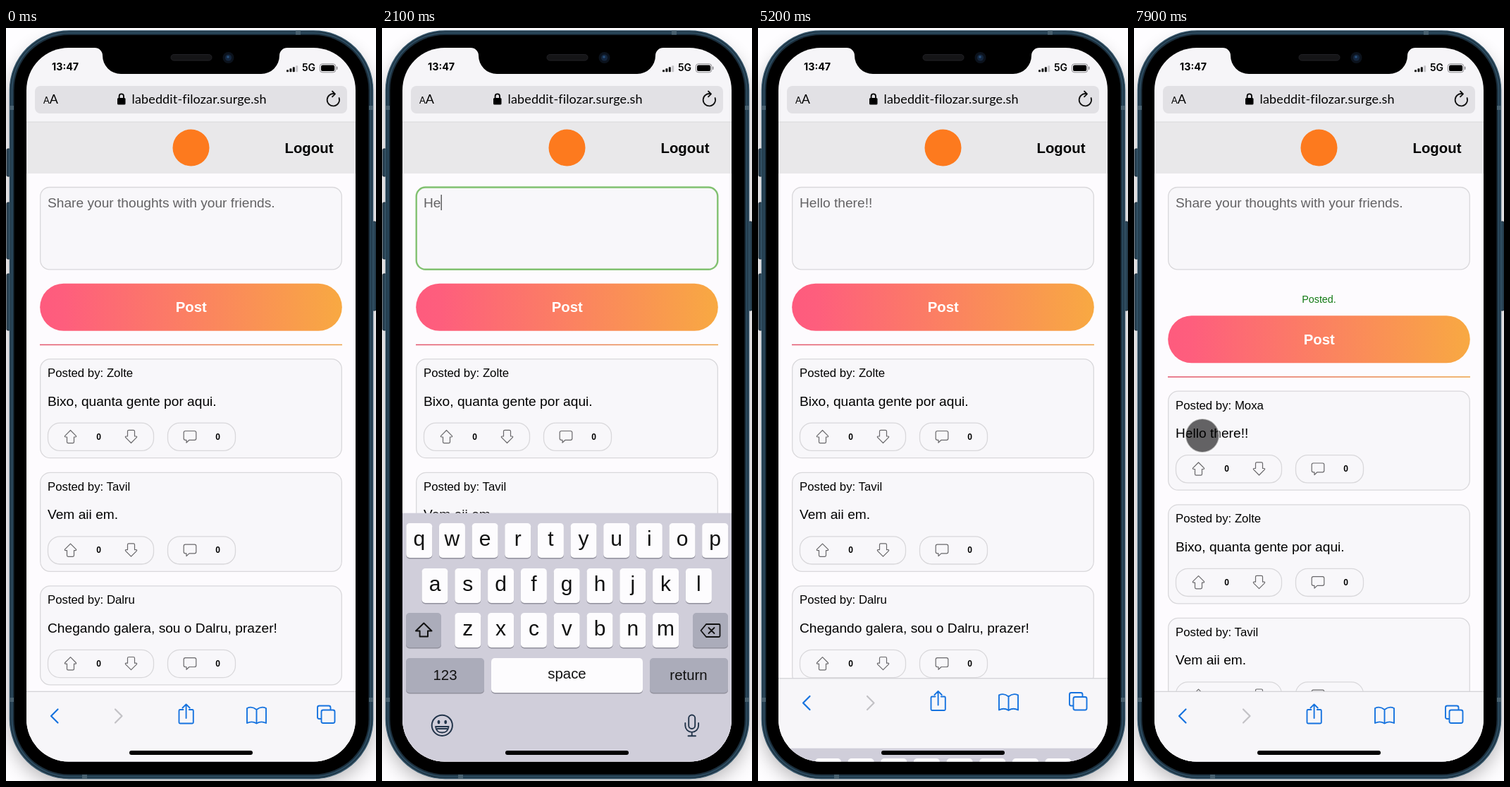
Write an HTML page that moves like this. It is 525x1066 px and loops after 8000 ms.

```html
<!DOCTYPE html>
<html lang="en">
<head>
<meta charset="utf-8">
<title>Posting on a phone</title>
<style>
  html, body { margin: 0; width: 100%; height: 100%; overflow: hidden; background: #fff; }
  svg { display: block; width: 525px; height: 1066px; }
  text { font-family: "Liberation Sans", Arial, sans-serif; white-space: pre; }
  .box { fill: #f8f7fa; stroke: #d9d8db; stroke-width: 1.3; }
  .line { fill: none; stroke-linecap: round; stroke-linejoin: round; }
  .bold { font-weight: 700; }
  .mid { text-anchor: middle; }
  .body { font-size: 19.16px; }
  .grey { fill: #636264; }
</style>
</head>
<body>
<svg id="stage" viewBox="0 0 525 1066"></svg>
<script>
const LOOP = 8000;
const TYPED = "Hello there!!";
const KEYBOARD = 351.5;

const rect = (x, y, w, h, r, attrs) =>
  `<rect x="${x}" y="${y}" width="${w}" height="${h}" rx="${r}" ${attrs}/>`;
const path = (d, color, width = 1.9) =>
  `<path class="line" d="${d}" stroke="${color}" stroke-width="${width}"/>`;
const text = (x, y, str, attrs = "") => `<text x="${x}" y="${y}" ${attrs}>${str}</text>`;
const group = (id, inner) => `<g id="${id}">${inner}</g>`;

const defs = `<defs>
  <linearGradient id="warm" gradientUnits="userSpaceOnUse" x1="48" x2="477" y1="0" y2="0">
    <stop stop-color="#fe5b7e"/><stop offset=".08" stop-color="#fe5e7d"/><stop offset="1" stop-color="#f8a942"/>
  </linearGradient>
  <linearGradient id="rule" gradientUnits="userSpaceOnUse" x1="48" x2="477" y1="0" y2="0">
    <stop stop-color="#e2566f"/><stop offset="1" stop-color="#eda145"/>
  </linearGradient>
  <filter id="soft" filterUnits="userSpaceOnUse" x="-60" y="-60" width="645" height="1220">
    <feGaussianBlur stdDeviation="14"/>
  </filter>
  <clipPath id="glass">${rect(29, 28, 467, 1010.5, 60, "")}</clipPath>
</defs>`;

function phone() {
  const sides = [[1, 171, 39], [1, 247, 80], [1, 348, 80], [520, 274, 126]]
    .map(([x, y, h]) => rect(x, y, 5, h, 1.5, 'fill="#2a4456" stroke="#16242f"')).join("");
  const bands = [[411, 3.5, 7, 6], [108, 1057, 7, 6], [5, 110, 6, 6], [515, 110, 6, 6], [5, 948, 6, 6], [515, 948, 6, 6]]
    .map(([x, y, w, h]) => rect(x, y, w, h, 0, 'fill="#48606f"')).join("");
  return rect(0, 0, 525, 1066, 0, 'fill="#fefdff"') +
    rect(6, 20, 514, 1050, 84, 'fill="#000" opacity=".3" filter="url(#soft)"') + sides +
    rect(5.5, 4, 515, 1058.5, 84, 'fill="#1b2e3c" stroke="#35566b" stroke-width="1.5"') +
    rect(8.5, 7, 509, 1052.5, 81, 'fill="none" stroke="#2d4d62" stroke-width="2"') + bands +
    rect(11.5, 10, 503, 1046.5, 78, 'fill="#000"');
}

function card(y, name, message) {
  const up = "M91.5 569.5L99.3 577.3Q100.3 579 98.5 579H96.5V586Q96.5 587.7 94.8 587.7H88.2Q86.5 587.7 86.5 586V579H84.5Q82.7 579 83.7 577.3Z";
  const bubble = "M254.5 570.5H267.5Q269.8 570.5 269.8 572.8V581Q269.8 583.3 267.5 583.3H260L256 587V583.3H254.5Q252.2 583.3 252.2 581V572.8Q252.2 570.5 254.5 570.5Z";
  const ink = "#69686b";
  return `<g transform="translate(0 ${y})">` +
    rect(48.7, 468.7, 427.6, 140, 14, 'class="box"') +
    text(59, 494, "Posted by: " + name, 'font-size="16.77"') +
    text(59, 534.5, message, 'class="body"') +
    rect(59.5, 559.2, 150, 39.2, 17, 'class="box"') +
    rect(229.5, 559.2, 96, 39.2, 17, 'class="box"') +
    path(up, ink, 1.2) +
    `<g transform="translate(269 1157) rotate(180)">${path(up, ink, 1.2)}</g>` +
    path(bubble, ink, 1.2) +
    [131.5, 300.5].map(x => text(x, 582.8, "0", 'class="bold mid" font-size="12"')).join("") +
    "</g>";
}

function page() {
  const posts = [
    ["Zolte", "Bixo, quanta gente por aqui."],
    ["Tavil", "Vem aii em."],
    ["Dalru", "Chegando galera, sou o Dalru, prazer!"]
  ];
  return rect(29, 133, 467, 910, 0, 'fill="#fdfbfe"') +
    rect(29, 133, 467, 73, 0, 'fill="#e9e8ea"') +
    '<circle cx="262.5" cy="169.5" r="26" fill="#fd7a1e"/>' +
    text(395.5, 177, "Logout", 'class="bold" font-size="20.35"') +
    rect(48.7, 225.5, 427.6, 116.3, 13, 'id="field" class="box"') +
    text(59, 254, "", 'id="entry" class="body grey"') +
    rect(0, 236, 1.4, 22, 0, 'id="caret" fill="#555"') +
    text(262.5, 389, "Posted.", 'id="notice" class="mid" font-size="14.36" fill="#127a14"') +
    group("lower",
      rect(48.2, 361.7, 428.6, 67, 33.5, 'fill="url(#warm)"') +
      text(262.7, 402, "Post", 'class="bold mid" font-size="20.35" fill="#fff"') +
      rect(48, 447.7, 429, 1.5, 0, 'fill="url(#rule)"') +
      group("fresh", card(0, "Moxa", TYPED)) +
      group("feed", posts.map((p, i) => card(i * 160.6, ...p)).join("")));
}

function topBar() {
  const bars = [3, 5, 7, 9].map((h, i) =>
    rect(398 + i * 4.4, 62.2 - h, 3, h, 0.8, `fill="${i < 3 ? "#111" : "#c5c4c8"}"`)).join("");
  return rect(29, 28, 467, 105, 0, 'fill="#f6f5f8"') +
    rect(29, 132.5, 467, 1, 0, 'fill="#dad9dc"') +
    text(65, 59.5, "13:47", 'class="bold" font-size="14.3" style="font-family:Inter,sans-serif"') +
    bars + text(420, 61, "5G", 'font-size="14" font-weight="600" style="font-family:Inter,sans-serif"') +
    rect(445.3, 50.8, 22.5, 12, 3.6, 'fill="none" stroke="#8b8a8e"') +
    rect(447, 52.5, 19.2, 8.6, 2.2, "") + rect(469, 54.5, 1.4, 4.5, 0.7, 'fill="#8b8a8e"') +
    rect(41, 82, 443, 39, 8, 'fill="#e2e1e5"') +
    text(53, 107, 'A<tspan font-size="18">A</tspan>', 'font-size="13" style="font-family:Lato,sans-serif"') +
    rect(158, 99, 11.5, 9.5, 1.6, "") + path("M160.6 99V96.5A3.2 3.2 0 0 1 167 96.5V99", "#000", 1.8) +
    text(178.5, 107, "labeddit-filozar.surge.sh", 'font-size="18" letter-spacing=".15" style="font-family:Lato,sans-serif"') +
    path("M472.6 99A8.7 8.7 0 1 1 466 93.2M463 89.5L467 93.3L463 97.3", "#111", 1.8) +
    '<path d="M126 27H399V28A11 11 0 0 0 388 39A26 26 0 0 1 362 65H163A26 26 0 0 1 137 39A11 11 0 0 0 126 28Z"/>' +
    rect(234, 37.5, 58, 8.5, 4.2, 'fill="#151517" stroke="#222226"') +
    '<circle cx="315.5" cy="42" r="8" fill="#0b121c"/><circle cx="315.5" cy="42" r="4.6" fill="#14263f"/><circle cx="315" cy="41" r="1.8" fill="#28507c"/>';
}

function toolbar() {
  const blue = "#1673df";
  return rect(29, 939, 467, 100, 0, 'fill="#f7f6f9"') +
    rect(29, 938.7, 467, 1.2, 0, 'fill="#d1d0d4"') +
    path("M73.5 964.5L64 974L73.5 983.5", blue, 2.2) +
    path("M155 964.5L164.5 974L155 983.5", "#c3c2c6", 2.2) +
    path("M251.5 965H247Q245.5 965 245.5 966.5V983Q245.5 984.5 247 984.5H264.3Q265.8 984.5 265.8 983V966.5Q265.8 965 264.3 965H259.8M255.6 977V957.5M250.5 962.5L255.6 957.4L260.7 962.5", blue) +
    path("M355.5 965Q349 959.5 342 963V984Q349 980.5 355.5 984.5Q362 980.5 369 984V963Q362 959.5 355.5 965V984.5", blue) +
    path("M447.5 978H444.5Q442 978 442 975.5V962Q442 959.5 444.5 959.5H458Q460.5 959.5 460.5 962V965M450 965.5H464Q466.5 965.5 466.5 968V981.5Q466.5 984 464 984H450Q447.5 984 447.5 981.5V968Q447.5 965.5 450 965.5Z", blue);
}

function keyboard() {
  const key = (x, y, w, fill = "#fdfcfe") =>
    rect(x, y + 1.4, w, 49, 5, 'fill="#92919d"') + rect(x, y, w, 49, 5, `fill="${fill}"`);
  const dark = "#abacba", ink = "#22344a";
  const rows = [["qwertyuiop", 52.8, 701], ["asdfghjkl", 75, 765], ["zxcvbnm", 121.8, 828]];
  const letters = rows.map(([row, x0, y]) => [...row].map((c, i) => {
    const x = x0 + i * 46.8 - (row.length > 9 ? i * 0.15 : 0);
    return key(x - 18.5, y, 37) + text(x, y + 32, c, 'class="mid" font-size="30" fill="#111"');
  }).join("")).join("");
  const label = (x, y, s) => text(x, y, s, 'class="mid" font-size="20.4" fill="#111"');
  return rect(29, 686.7, 467, 360, 0, 'fill="#d0ceda"') + letters +
    key(34, 828, 50, dark) + key(441, 828, 50, dark) +
    key(34, 892, 111, dark) + key(155, 892, 215) + key(380, 892, 111, dark) +
    path("M59.3 842.5L70.5 853.5H65V861.5H53.6V853.5H48Z", "#111", 2) +
    path("M460 844H478Q479.5 844 479.5 845.5V860.5Q479.5 862 478 862H460L452.5 853ZM463.5 849L471.5 857M471.5 849L463.5 857", "#111", 1.8) +
    label(89.5, 923, "123") + label(262.5, 921, "space") + label(435, 923, "return") +
    `<circle cx="85.3" cy="987.3" r="14.6" fill="none" stroke="${ink}" stroke-width="2"/>` +
    `<ellipse cx="80.5" cy="982.5" rx="1.9" ry="2.7" fill="${ink}"/><ellipse cx="90.2" cy="982.5" rx="1.9" ry="2.7" fill="${ink}"/>` +
    path("M76 989H94.6Q93.5 997.5 85.3 997.5Q77 997.5 76 989ZM78.5 992H92.2", ink, 1.8) +
    rect(435.2, 972.5, 9, 19.5, 4.5, `fill="none" stroke="${ink}" stroke-width="1.9"`) +
    path("M430.3 984V987.5A9.4 9.4 0 0 0 449.1 987.5V984M439.7 997V1002M434.5 1002.3H445", ink, 1.9);
}

const stage = document.getElementById("stage");
stage.innerHTML = defs + phone() +
  `<g clip-path="url(#glass)">${page()}${topBar()}${group("tools", toolbar())}${group("keys", keyboard())}</g>` +
  rect(175, 1023, 175, 6, 3, 'fill="#000"') +
  '<circle id="touch" r="24" fill="#000" fill-opacity=".6" stroke="#fff" stroke-opacity=".6" stroke-width="2.2"/>';

const $ = id => document.getElementById(id);
const show = (id, on) => $(id).setAttribute("visibility", on ? "visible" : "hidden");
const shift = (id, y) => $(id).setAttribute("transform", `translate(0 ${y})`);
const ramp = (t, a, b) => Math.min(1, Math.max(0, (t - a) / (b - a)));
const ease = u => 1 - (1 - u) ** 3;

// Touches: start, end, x, y
const touches = [[700, 1150, 229.5, 279], [4600, 5100, 48, 345], [6000, 6500, 148.3, 385], [7700, 8150, 97, 577]];

function render(t) {
  const focus = t >= 1000 && t < 4800;
  const posted = t >= 6900;
  const count = Math.min(TYPED.length, Math.max(0, Math.floor((t - 1950) / 140) + 1));
  const draft = t < 6300 ? TYPED.slice(0, count) : "";
  const typing = t > 1900 && t < 3900;

  const entry = $("entry");
  entry.textContent = draft || "Share your thoughts with your friends.";
  $("caret").setAttribute("x", 59 + (draft ? entry.getComputedTextLength() : 0));
  show("caret", focus && (typing || t % 1000 < 500));
  $("field").style.cssText = focus ? "stroke:#82c171;stroke-width:2.4px" : "";

  const up = ease(ramp(t, 1050, 1450));
  const down = ease(ramp(t, 4950, 5350));
  shift("keys", KEYBOARD * (1 - up + down));
  shift("tools", t >= 4800 ? -KEYBOARD * (1 - down) : 0);

  show("notice", posted);
  show("fresh", posted);
  shift("lower", posted ? 45.5 : 0);
  shift("feed", posted ? 160.6 : 0);

  const hit = touches.find(([a, b]) => t >= a && t < b);
  show("touch", hit);
  if (hit) {
    const [a, b, x, y] = hit;
    $("touch").setAttribute("cx", x);
    $("touch").setAttribute("cy", y);
    $("touch").setAttribute("opacity", Math.min(ramp(t, a, a + 120), 1 - ramp(t, b - 140, b)));
  }
}

const start = performance.now();
function tick() {
  // Ten pictures a second
  render(Math.floor(((performance.now() - start) % LOOP) / 100) * 100);
  requestAnimationFrame(tick);
}
tick();
</script>
</body>
</html>
```
